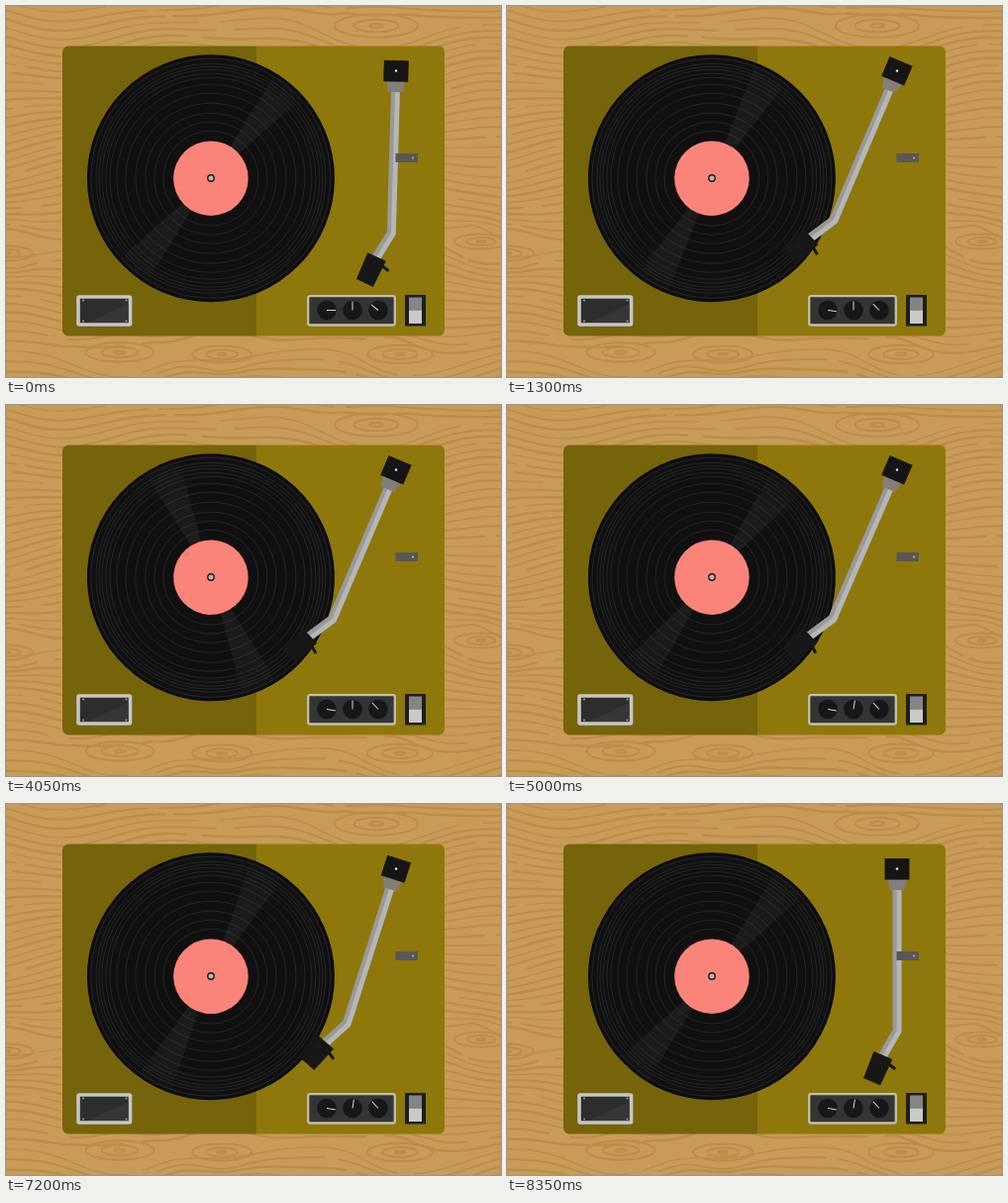
An HTML page for the animation above (8450 ms loop, 500 by 375 pixels).

```html
<!DOCTYPE html>
<html lang="en">
<head>
<meta charset="utf-8">
<title>Turntable</title>
<style>
  html, body { margin: 0; width: 100%; height: 100%; overflow: hidden; background: #c89b59; }
  svg { display: block; width: 500px; height: 375px; }
</style>
</head>
<body>
<svg viewBox="0 0 500 375">
  <defs>
    <radialGradient id="shine" gradientUnits="userSpaceOnUse" cx="0" cy="0" r="125">
      <stop offset=".3" stop-color="#fff" stop-opacity=".05"/>
      <stop offset=".7" stop-color="#fff" stop-opacity=".045"/>
      <stop offset="1" stop-color="#fff" stop-opacity=".01"/>
    </radialGradient>
    <clipPath id="deck"><rect x="57" y="40.5" width="386" height="293" rx="6"/></clipPath>
  </defs>

  <rect width="500" height="375" fill="#c89b59"/>
  <g id="grain" fill="none" stroke="#bc8d49" stroke-linecap="round"/>

  <g clip-path="url(#deck)">
    <rect x="57" y="40" width="196" height="294" fill="#75640a"/>
    <rect x="253" y="40" width="190" height="294" fill="#8e780b"/>
  </g>

  <g id="record">
    <circle r="125" fill="#070707"/>
    <circle r="123.5" fill="#101010"/>
    <g id="grooves" fill="none" stroke="#2e2e2e" stroke-width=".7"/>
    <g id="wedges" fill="url(#shine)"/>
    <circle r="37.800" fill="#fa837a"/>
  </g>
  <circle cx="207" cy="174" r="3.2" fill="#b4b8b8" stroke="#1b1b1b" stroke-width="1.4"/>

  <rect x="73" y="294" width="52.500" height="28" rx="1" fill="#2d2d2d" stroke="#c6c7c3" stroke-width="3.600"/>
  <path d="M83 320 L123.500 301 V320Z" fill="#363636"/>
  <path d="M78 297.500h.01M121.500 297.500h.01M78 318.500h.01M121.500 318.500h.01" stroke="#999" stroke-width="2" stroke-linecap="round"/>

  <rect x="305.200" y="293.200" width="87.600" height="29.300" rx="2" fill="#343434" stroke="#c2bfa9" stroke-width="2.300"/>
  <g id="knobs"/>

  <rect x="403" y="292" width="21" height="31.500" fill="#1e1e1e"/>
  <rect x="407" y="294.500" width="13" height="13" fill="#858585"/>
  <rect x="407" y="307.500" width="13" height="13.500" fill="#c9c9c7"/>

  <g id="arm">
    <g fill="none" stroke-linejoin="miter">
      <path d="M394 85 V229.500 L378.500 256" stroke="#999" stroke-width="9"/>
      <path d="M396 85 V230 L380.500 257" stroke="#b6b6b6" stroke-width="4.800"/>
    </g>
    <path d="M384.500 75 H403.500 L401.500 87 H386.500Z" fill="#827f78"/>
    <rect x="381.500" y="55" width="25" height="21.500" fill="#151515"/>
    <circle cx="394" cy="65.500" r="1.300" fill="#ddd"/>
    <path d="M385 262.500 L392.300 268" stroke="#151515" stroke-width="3"/>
    <path d="M370.500 250 L389.300 258 L377 284.500 L360 277Z" fill="#171717"/>
  </g>
  <rect x="393.500" y="149" width="22.500" height="9" fill="#575757"/>
  <circle cx="411" cy="153.500" r="1" fill="#bbb"/>
</svg>
<script>
const LOOP = 8450, STEP = 50;
const $ = id => document.getElementById(id);
const add = (parent, tag, attrs) => {
  const el = document.createElementNS('http://www.w3.org/2000/svg', tag);
  for (const key in attrs) el.setAttribute(key, attrs[key]);
  return parent.appendChild(el);
};

// Wood: long wavy lines that bend around a few knots.
const knots = [[374, 20, 56], [0, 250, 36], [115, 350, 46], [218, 352, 40], [398, 352, 44], [480, 238, 36]];
for (let row = -30, i = 0; row < 410; row += 8.5, i++) {
  let d = '';
  for (let x = -10; x <= 510; x += 6) {
    let y = row + 9 * Math.sin(x / 52 + row / 60) + 4 * Math.sin(x / 25 - row / 38);
    for (const [kx, ky, w] of knots) {
      const near = Math.exp(-(((x - kx) / w) ** 2));
      const gap = y - ky;
      y += Math.sign(row - ky) * 17 * near * Math.exp(-Math.abs(gap) / 26);
    }
    d += (d ? 'L' : 'M') + x + ' ' + y.toFixed(1);
  }
  add($('grain'), 'path', {
    d, 'stroke-width': 1.4 + i % 3 * .5,
    'stroke-dasharray': `${160 + i * 37 % 130} ${8 + i * 13 % 16}`, 'stroke-dashoffset': i * 53
  });
}
for (const [cx, cy, w] of knots)
  for (const k of [.12, .4, .75])
    add($('grain'), 'ellipse', { cx, cy, rx: w * k, ry: w * k * .28, 'stroke-width': 2 });

for (const r of [121, 116, 113, 110, 106, 102, 95, 86, 76, 66, 57, 48])
  add($('grooves'), 'circle', { r });
for (const turn of [40, 220])
  add($('wedges'), 'path', { d: 'M0 0 L-18 -121 A122 122 0 0 1 18 -121Z', transform: `rotate(${turn})` });

const pointers = [324, 350, 376].map(x => {
  const knob = add($('knobs'), 'g', { transform: `translate(${x} 307.5)` });
  add(knob, 'circle', { r: 9.8, fill: '#171717' });
  return add(knob, 'path', { d: 'M0 0V-9', stroke: '#d5d5d5', 'stroke-width': 1 });
});

const progress = (t, from, to) => Math.min(1, Math.max(0, (t - from) / (to - from)));
const ease = (t, from, to) => (1 - Math.cos(Math.PI * progress(t, from, to))) / 2;

function armAngle(t) {
  const playing = 24.4 * ease(t, -100, 500) - 2.1 * ease(t, 500, 1800) + 1.75 * progress(t, 1800, 6800);
  const u = progress(t, 6800, 7900);
  return playing * (u < .5 ? 1 - 2 * u * u : 2 * (1 - u) ** 2);
}

function spinAngle(t) {
  const u = progress(t, 550, 8050);
  return 1800 * (u - .01 * Math.sin(2 * Math.PI * u));
}

function draw(t) {
  $('record').setAttribute('transform', `translate(206.9 174.2) rotate(${spinAngle(t)})`);
  $('arm').setAttribute('transform', `rotate(${armAngle(t)} 394 65.5)`);
  const first = ease(t, 1000, 1400);
  const second = ease(t, 1900, 2300) - ease(t, 3500, 3900) + ease(t, 4500, 4900);
  [90 + 9 * first, 9 * second, -51 + 8 * first].forEach((angle, i) =>
    pointers[i].setAttribute('transform', `rotate(${angle})`));
}

const start = performance.now();
function tick() {
  const t = (performance.now() - start) % LOOP;
  draw(Math.floor(t / STEP) * STEP);
  requestAnimationFrame(tick);
}
tick();
</script>
</body>
</html>
```
